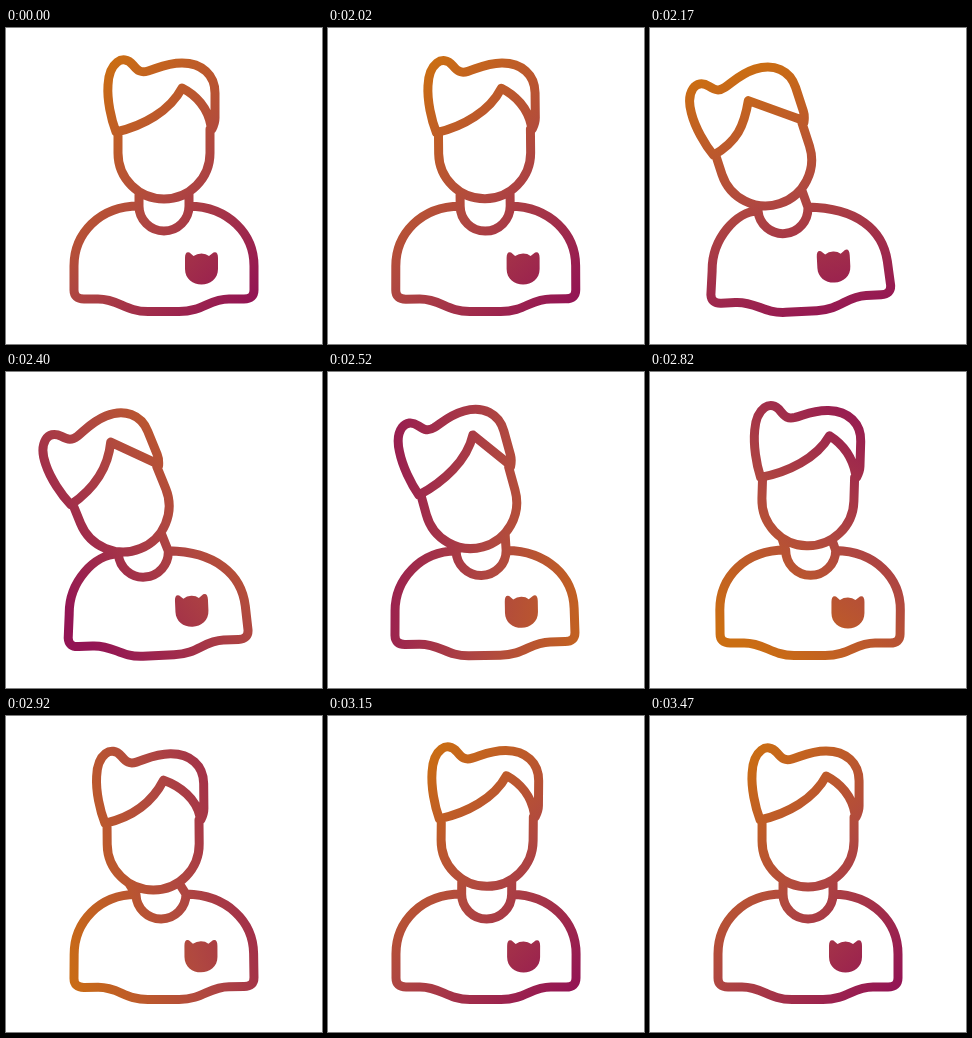
An HTML page for the animation above (3.5 s loop, 316 by 316 pixels).

```html
<!DOCTYPE html>
<html lang="en">
<head>
<meta charset="utf-8">
<title>Avatar</title>
<style>
  html, body { margin: 0; height: 100%; overflow: hidden; background: #fff; }
  svg { display: block; width: 100vw; height: 100vh; }
</style>
</head>
<body>
<svg viewBox="0 0 316 316">
  <defs>
    <linearGradient id="ink" gradientUnits="userSpaceOnUse" x1="32" y1="158" x2="304" y2="158">
      <stop offset="0" stop-color="#cb6e12"/>
      <stop offset="0.5" stop-color="#b04840"/>
      <stop offset="1" stop-color="#931454"/>
    </linearGradient>
  </defs>
  <path id="lines" fill="none" stroke="url(#ink)" stroke-width="9" stroke-linecap="round" stroke-linejoin="round"/>
  <path id="badge" fill="url(#ink)"/>
</svg>
<script>
const LOOP = 3500;
const ink = document.getElementById('ink');
const lines = document.getElementById('lines');
const badge = document.getElementById('badge');

// time, head x, head y, head tilt, fringe shift, body x, body tilt, collar shift, gradient angle
const poses = [
  [2000, 157.5, 102.5, 0, 0, 0, 0, 0, 45],
  [2170, 108.5, 111, -18, -16, -7, -3, -25, 74],
  [2290, 95, 116, -24, -11, -8, -3.4, -29, 105],
  [2520, 136, 109, -15.5, 2, -1, -1, -5, 185],
  [2670, 180, 105, 6, 18, 6, 0.7, 13.5, 250],
  [2920, 146.5, 105.5, -0.5, -7, 0, -0.3, -3, 345],
  [3090, 157, 102.5, 0.2, -1, 0, 0, 0, 405],
  [3230, 159.5, 101.5, 0.8, 2, 0, 0.1, 1, 405],
  [3500, 157.5, 102.5, 0, 0, 0, 0, 0, 405]
];

// Slope at a key: zero at the ends and at turning points
function slope(i, k) {
  const a = poses[i - 1], b = poses[i], c = poses[i + 1];
  if (!a || !c || (b[k] - a[k]) * (c[k] - b[k]) <= 0) return 0;
  return (c[k] - a[k]) / (c[0] - a[0]);
}

function poseAt(t) {
  if (t <= poses[0][0]) return poses[0];
  let i = 0;
  while (i < poses.length - 2 && t > poses[i + 1][0]) i++;
  const a = poses[i], b = poses[i + 1], d = b[0] - a[0];
  const u = (t - a[0]) / d, v = 1 - u;
  return a.map((p, k) => k === 0 ? t :
    p * v * v * (1 + 2 * u) + b[k] * u * u * (3 - 2 * u) +
    d * u * v * (v * slope(i, k) - u * slope(i + 1, k)));
}

// Maps points turned about (cx, cy), with that centre moved to (x, y)
function frame(cx, cy, x, y, deg) {
  const c = Math.cos(deg * Math.PI / 180), s = Math.sin(deg * Math.PI / 180);
  return (px, py) => [x + (px - cx) * c - (py - cy) * s, y + (px - cx) * s + (py - cy) * c];
}

// Path segment: letter followed by points
const seg = (cmd, ...pts) => cmd + pts.map(p => p[0].toFixed(2) + ' ' + p[1].toFixed(2)).join(' ');
const mix = (a, b, k) => [a[0] + (b[0] - a[0]) * k, a[1] + (b[1] - a[1]) * k];
const arc = (r, end) => seg(`A${r} ${r} 0 0 0 `, end);

function headPath(h, a, tilt) {
  const q = Math.max(0, a) * 0.42;
  const apex = [176 + a, 60 + Math.abs(a) * 0.18], temple = [205, 98];
  // The right side of the fringe straightens as the head tilts
  const flat = Math.min(1, Math.abs(tilt) / 12);
  const f1 = mix([190 + a * 0.6, 67], mix(apex, temple, 1 / 3), flat);
  const f2 = mix([202, 80], mix(apex, temple, 2 / 3), flat);
  return [
    seg('M', h(112, 104)), seg('L', h(112, 125)), arc(46, h(204, 125)), seg('L', h(204, 101)),
    seg('M', h(110, 104)),
    seg('C', h(105 + q / 3, 91), h(101 + q, 72), h(102 + q, 57)),
    seg('C', h(103 + q, 35), h(117 + q, 25), h(127 + q, 37)),
    seg('C', h(132 + q, 43), h(135 + q, 45), h(142 + q, 43)),
    seg('C', h(152 + q / 2, 40), h(161, 35), h(176, 35)),
    seg('C', h(196, 35), h(209, 47), h(209, 65)),
    seg('L', h(209, 90)),
    seg('Q', h(209, 95), h(206, 101)),
    seg('M', h(110, 104)),
    seg('C', h(137, 98), h(apex[0] - 12, apex[1] + 23), h(...apex)),
    seg('C', h(...f1), h(...f2), h(...temple))
  ].join('');
}

function bodyPath(h, b, s) {
  const c = frame(158, 177.5, 158 + s, 177.5 + Math.abs(s) * 0.12, s * 0.18);
  const left = c(133, 178), right = c(183, 178);
  const lean = (x, y, k) => { const p = b(x, y); return [p[0] + s * k, p[1]]; };
  const sl = lean(68, 238, -0.1), sr = lean(248, 238, 0.08);
  const cl = [left[0] + (sl[0] - left[0]) * (0.615 + s * 0.006), left[1]];
  const cr = [right[0] + (sr[0] - right[0]) * 0.615, right[1] + 1];
  return [
    seg('M', h(133, 163.6)), seg('L', left), arc(25, right), seg('L', h(183, 163.6)),
    seg('M', left),
    seg('C', cl, lean(68, 206, -0.15), sl),
    seg('L', b(68, 262)), seg('Q', b(68, 271), b(78, 271)), seg('L', b(92, 271)),
    seg('C', b(113, 271), b(119, 283.5), b(142, 283.5)), seg('L', b(173, 283.5)),
    seg('C', b(197, 283.5), b(203, 271), b(223, 271)), seg('L', b(238, 271)),
    seg('Q', b(248, 271), b(248, 262)), seg('L', sr),
    seg('C', lean(248, 206, 0.2), cr, right)
  ].join('');
}

function badgePath(b, s) {
  const p = (x, y) => { const m = b(x, y); return [m[0] + s * 0.13, m[1]]; };
  return [
    seg('M', p(179, 230)),
    seg('Q', p(179, 223), p(183.5, 224.5)), seg('L', p(187.5, 228)),
    seg('Q', p(191, 225.5), p(195.5, 225.5)), seg('Q', p(200, 225.5), p(203, 228)),
    seg('L', p(207.5, 224.5)), seg('Q', p(212, 223), p(212, 230)),
    seg('L', p(212, 241)),
    seg('C', p(212, 251), p(204, 256.5), p(195.5, 256.5)),
    seg('C', p(187, 256.5), p(179, 251), p(179, 241)), 'Z'
  ].join('');
}

function draw(now) {
  const [, hx, hy, tilt, fringe, bx, lean, collar, angle] = poseAt(now % LOOP);
  const head = frame(157.5, 102.5, hx, hy, tilt);
  const body = frame(158, 266, 158 + bx, 266, lean);
  lines.setAttribute('d', headPath(head, fringe, tilt) + bodyPath(head, body, collar));
  badge.setAttribute('d', badgePath(body, collar));
  ink.setAttribute('gradientTransform', `rotate(${angle.toFixed(2)} 168 158)`);
}

const start = performance.now();
function tick() {
  draw(performance.now() - start);
  requestAnimationFrame(tick);
}
tick();
</script>
</body>
</html>
```
